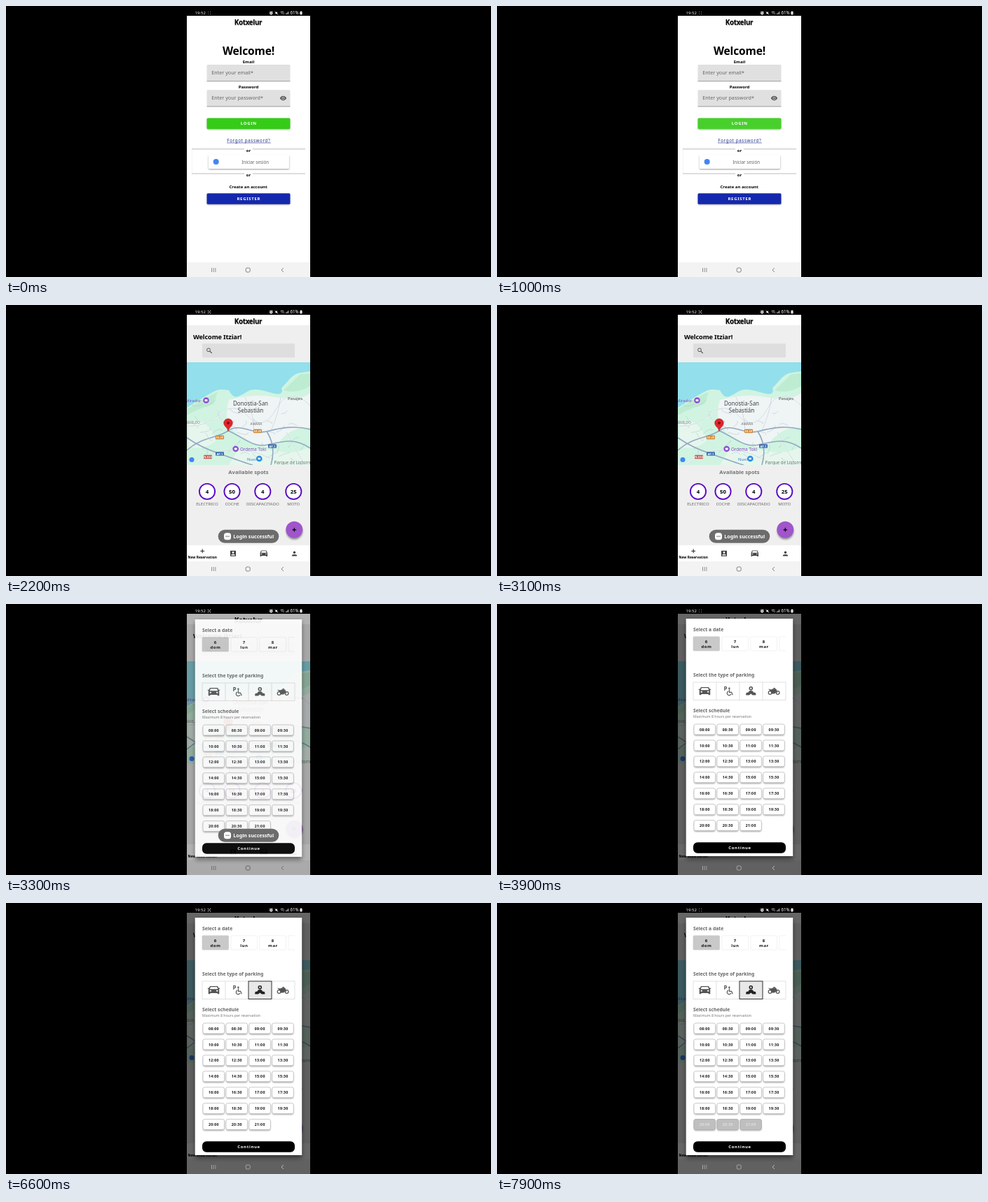
Write an HTML page that moves like this. It is 692 px wide and 388 px high and loops after 8 s.

```html
<!DOCTYPE html>
<html lang="en">
<head>
<meta charset="utf-8">
<title>Parking reservation</title>
<style>
html, body { margin: 0; width: 100%; height: 100%; overflow: hidden; background: #000; }
svg { display: block; font-family: "Noto Sans", "Open Sans", sans-serif; }
text { text-anchor: middle; font-weight: 500; }
.l { text-anchor: start; }
.b { font-weight: 700; }
.s { font-weight: 600; }
.a { animation: 8s linear infinite; }
#login { animation-name: login; }
#press { animation-name: press; }
#shift { animation-name: shift; }
#mark { animation-name: mark; }
#map { animation-name: map; }
#spots { animation-name: spots; }
#fab { animation-name: fab; }
#dim { animation-name: dim; }
#lit { animation-name: lit; }
#dialog { animation-name: dialog; }
#pick { animation-name: pick; }
#slot0 { animation-name: slot0; }
#slot1 { animation-name: slot1; }
#slot2 { animation-name: slot2; }
#toast { animation-name: toast; }
@keyframes login { 0%, 13.5% { opacity: 1; } 16%, 100% { opacity: 0; } }
@keyframes press { 0%, 12.3% { opacity: 0; } 13%, 100% { opacity: .3; } }
@keyframes shift { 0%, 24.9% { transform: translateY(41px); } 25%, 100% { transform: none; } }
@keyframes mark { 0%, 18.2% { opacity: 0; } 19%, 100% { opacity: 1; } }
@keyframes map { 0%, 23.7% { opacity: 0; } 27.2%, 100% { opacity: 1; } }
@keyframes spots { 0%, 24.9% { opacity: 0; } 25%, 100% { opacity: 1; } }
@keyframes fab { 0%, 34.5% { opacity: 0; } 35.2% { opacity: .3; } 36.5%, 100% { opacity: 0; } }
@keyframes dim { 0%, 40.6% { opacity: 0; } 41.25% { opacity: .3; } 43.75%, 100% { opacity: .6; } }
@keyframes lit { 0%, 40.6% { opacity: 0; } 43.75%, 100% { opacity: 1; } }
@keyframes dialog {
  0%, 40.6% { opacity: 0; transform: translateY(3px); }
  41.25% { opacity: .92; transform: translateY(1px); }
  43.75%, 100% { opacity: 1; transform: none; }
}
@keyframes pick { 0%, 54.6% { opacity: 0; } 58.75%, 100% { opacity: 1; } }
@keyframes slot0 { 0%, 82.5% { opacity: 0; } 85%, 100% { opacity: 1; } }
@keyframes slot1 { 0%, 86.5% { opacity: 0; } 89%, 100% { opacity: 1; } }
@keyframes slot2 { 0%, 92% { opacity: 0; } 95%, 100% { opacity: 1; } }
@keyframes toast { 0%, 18.2% { opacity: 0; } 20%, 41.5% { opacity: 1; } 45%, 100% { opacity: 0; } }
</style>
</head>
<body>
<svg id="stage" width="692" height="388" viewBox="0 0 692 388">
  <defs>
    <clipPath id="phone"><path d="M258 0h176v388h-176z"/></clipPath>
    <clipPath id="mapBox"><path d="M258 82.500h176v146.500h-176z"/></clipPath>
    <filter id="soft" x="-20%" y="-20%" width="140%" height="160%"><feGaussianBlur stdDeviation="1"/></filter>
    <filter id="wide" x="-10%" y="-10%" width="120%" height="120%"><feGaussianBlur stdDeviation="3"/></filter>
  </defs>
</svg>
<script>
const text = (x, y, str, size, fill = '#000', cls = '', gap = 0) =>
  `<text x="${x}" y="${y}" font-size="${size}" fill="${fill}" class="${cls}" letter-spacing="${gap}">${str}</text>`;
const rect = (x, y, w, h, fill, r = 0, more = '') =>
  `<rect x="${x}" y="${y}" width="${w}" height="${h}" fill="${fill}" rx="${r}" ${more}/>`;
const dot = (x, y, r, fill, more = '') => `<circle cx="${x}" cy="${y}" r="${r}" fill="${fill}" ${more}/>`;
const line = (d, stroke, w = 1, more = '') => `<path d="${d}" fill="none" stroke="${stroke}" stroke-width="${w}" ${more}/>`;
const icon = (d, x, y, s, fill, sy = s) =>
  `<path transform="translate(${x} ${y}) scale(${s} ${sy}) translate(-12 -12)" d="${d}" fill="${fill}" fill-rule="evenodd"/>`;
const group = (id, body) => `<g id="${id}" class="a">${body}</g>`;
const shadow = (x, y, w, h, r, o = .4, blur = 'soft') => rect(x, y, w, h, '#000', r, `opacity="${o}" filter="url(#${blur})"`);
const band = (y, h, fill) => rect(258, y, 176, h, fill);

// Icons on a 24-unit grid
const CAR = 'M3 12L5 6Q5.4 5 6.5 5h11Q18.6 5 19 6l2 6v9h-3v-2H6v2H3zM5.2 11h13.6L17.3 6.7H6.7zM5 14.5a1.5 1.5 0 1 0 3 0a1.5 1.5 0 1 0-3 0zm11 0a1.5 1.5 0 1 0 3 0a1.5 1.5 0 1 0-3 0z';
const PERSON = 'M12 12a4 4 0 1 0 0-8a4 4 0 0 0 0 8zM4 20v-2q0-4 8-4t8 4v2z';
const CARD = 'M3 3h18v18H3zM12 12a3 3 0 1 0 0-6a3 3 0 0 0 0 6zM6 18h12v-1q0-3-6-3t-6 3z';
const EYE = 'M1 12Q5 4.5 12 4.5T23 12Q19 19.5 12 19.5T1 12zM12 17a5 5 0 1 0 0-10a5 5 0 0 0 0 10zM12 15a3 3 0 1 1 0-6a3 3 0 0 1 0 6z';
const BRAND = '#4285f4';

const title = text(346, 28, 'Kotxelur', 9.8, '#aaa', 'b', -.3) + text(345.5, 27, 'Kotxelur', 9.8, '#000', 'b', -.3);

const statusBar = () => band(0, 14, '#000') +
  text(269.5, 12, '19:52', 6, '#eee', 'l') +
  `<path d="M288 8h1v1h-1zm3 0h1v1h-1zm-3 3h1v1h-1zm3 0h1v1h-1z" fill="#999"/>` +
  `<g id="scan">${line('M288 9.2V8h1.2M290.8 8H292v1.2M292 10.8V12h-1.2M289.2 12H288v-1.2M289 9l2 2M291 9l-2 2', '#bbb', .6)}</g>` +
  dot(378.3, 10.2, 1.6, '#555', 'stroke="#fff" stroke-width="1.2"') + line('M376 8.4l1-1M380.6 8.4l-1-1', '#fff', .8) +
  icon('M4 9h5l7-6v18l-7-6H4z', 386, 10, .23, '#fff') + line('M383.6 7.6l4.8 4.8', '#fff', .6) +
  line('M391.5 9q2.5-2 5 0M392.7 10.5q1.3-1 2.6 0', '#ddd', .8) + line('M395.5 12.2l1.500-2', '#ddd', .7) +
  line('M399.5 12v-1.200M401 12v-2.400M402.6 12V8', '#ddd', .9) +
  text(405.5, 12.2, '61%', 6.2, '#fff', 'l') + rect(419.3, 8, 3.4, 4.5, '#ddd', 1) + line('M421 7v2', '#fff', .9);

const navKeys = ink => line('M293.5 375v6M296.2 375v6M298.9 375v6', ink, .8) +
  rect(342.2, 375, 6, 6, 'none', 1.8, `stroke="${ink}" stroke-width=".9"`) +
  line('M396 375l-3 3l3 3', ink, .9);
const navStrip = () => band(367, 21, '#f3f3f3') + navKeys('#777');

const field = (y, label, hint) => text(346, y - 2.2, label, 6, '#000', 's') +
  rect(286.5, y, 119, 24, '#e0e0e0', 1.5) + line(`M286.5 ${y + 23.7}h119`, '#8c8c8c', .8) +
  text(293.3, y + 14.2, hint, 7.1, '#666', 'l', .04);

const button = (y, h, label, fill, gap) => shadow(287, y + 1, 118, h, 1.5, .35) +
  rect(286.5, y, 119, h, fill, 1.5) + text(346.3, y + h / 2 + 2.2, label, 6, '#fff', 's', gap);

const divider = y => line(`M265 ${y}h75M352 ${y}h75`, '#b5b5b5', .9) + text(346, y + 4.2, 'or', 6, '#000', 's');

const login = () => band(14, 353, '#fff') + title +
  text(346, 70, 'Welcome!', 15.6, '#000', 'b', -.15) +
  field(84, 'Email', 'Enter your email*') +
  field(120.2, 'Password', 'Enter your password*') + icon(EYE, 395.5, 132, .42, '#555') +
  button(160.5, 15.5, 'LOGIN', '#35cc17', .65) +
  group('press', rect(286.5, 160.5, 119, 15.5, '#fff', 1.5)) +
  text(346.3, 194.6, 'Forgot password?', 6.2, '#26358f', '', .65) + line('M315 196h63', '#26358f', .6) +
  line('M265.5 205v34', '#eee', .6) + divider(204.8) +
  shadow(289, 214.5, 115, 19.5, 1) + rect(288.8, 213, 115.2, 20, '#fff', 1) +
  dot(299.7, 223, 4, BRAND) + text(355.7, 225.5, 'Iniciar sesión', 6.3, '#666') +
  divider(240) + text(345.7, 260.6, 'Create an account', 6, '#000', 's') +
  button(268.2, 15.5, 'REGISTER', '#1428ad', .7) + navStrip();

const shield = (x, y, str, fill) => rect(x - 6, y - 2.7, 12, 5.4, fill, 1) + text(x, y + 1.6, str, 4, '#fff', 'b');

// A loose web of side streets
const streets = () => {
  let d = '';
  for (let i = 0; i < 34; i++) {
    const x = 266 + (i * 61.8) % 160, y = 142 + (i * 37.3) % 78;
    d += `M${x} ${y}q${8 * Math.sin(i)} ${6 * Math.cos(i * 2)} ${16 * Math.cos(i * 3)} ${10 * Math.sin(i * 5)}`;
  }
  return line(d, '#b9c9d6', .6);
};

const map = () => {
  const main = 'M258 208C280 188 300 192 317 180S352 186 372 181S410 172 434 178M317 180C340 190 352 205 374 200S412 190 434 205M258 190C275 202 290 208 305 213S340 226 352 229M372 181C381 195 383 212 378 229';
  const minor = 'M258 174q30 0 48-18t40 4t40-12t48-4M300 150q10 20 17 30M340 130q14 24 14 52M392 132q-4 26-14 48M400 182q10 22 26 46M270 229q20-20 50-22t60 14';
  return `<g clip-path="url(#mapBox)">` + band(82, 147, '#93dfec') +
    `<path d="M258 147Q272 138 284 131T301 122T318 122Q324 134 331 131T346 123T376 125T393 119L403 108Q411 98 420 97L434 95V229H258z" fill="#d0f4e1"/>` +
    `<path d="M318 136Q350 126 385 132T434 126V176Q408 174 392 194T340 190Q306 176 318 136z" fill="#eff4f4"/>` +
    `<path d="M260 168q14-6 25 3t14 24q-18 14-39 8zM330 209q30-6 55 0t49-6v26H318z" fill="#e6f6ed"/>` +
    `<path d="M258 149Q275 138 302 124L296 142Q275 148 258 158zM396 122L420 99L434 98V116Q415 128 396 122z" fill="#bdecd2"/>` +
    streets() + line(minor, '#fff', 1.4) + line(minor, '#b5c6d5', .7) + line(main, '#93a9c1', 1.6) +
    text(256, 139.3, 'Mirador', 6, '#8350bd', 'l') + dot(285.5, 136.5, 4.3, '#8e4fd0') + rect(283.6, 135, 3.8, 3, '#fff', .6) +
    text(349, 143.6, 'Donostia-San', 8, '#444') + text(349, 153.5, 'Sebastián', 8, '#444') +
    text(412.5, 135.7, 'Pasajes', 6, '#444') + text(357, 171.5, 'AMARA', 4.6, '#666', '', .2) +
    text(256, 169.5, 'IGUELDO', 4.6, '#777', 'l', .1) +
    shield(305, 189.5, 'GI-20', '#cf8232') + shield(359, 180.5, 'GI-20', '#cf8232') +
    shield(380, 202, 'AP-1', '#3f6fb0') + shield(305, 213, 'AP-1', '#3f6fb0') + shield(288, 217.5, 'N-634', '#c05a57') +
    dot(327.7, 206, 4.3, '#8e4fd0') + rect(325.8, 204.5, 3.8, 3, '#fff', .4) +
    text(334, 209, 'Ordema Toki', 6.2, '#8350bd', 'l') +
    text(344, 222.8, 'Nuxi', 6, '#3a78c9', 'l') + dot(361.3, 220, 4.3, '#2f8fe0') + rect(359.6, 218.8, 3.4, 2.4, '#fff', .4) +
    text(382.5, 228, 'Parque de Listorreta', 6.2, '#667a70', 'l') +
    `<path d="M317 181Q316.500 177 312.500 173.500A6.300 6.300 0 1 1 321.500 173.500Q317.500 177 317 181z" fill="#e3242b" stroke="#9c1a20" stroke-width=".5"/>` +
    dot(317, 169, 2, '#7c1116') + '</g>';
};

const spot = ([x, n, label]) =>
  dot(x, 267, 11.1, '#fff', 'stroke="#5a0ac4" stroke-width="1.9"') +
  text(x, 270, n, 7.8, '#000', 'b') + text(x, 287.4, label, 6.1, '#666');

const home = () => band(14, 330, '#efefef') + band(14, 15, '#fff') + title +
  text(267, 49, 'Welcome Itziar!', 9.2, '#000', 'b l', -.14) +
  rect(280, 55.3, 132, 20, '#dedede', 1) +
  dot(289, 64.3, 2.4, 'none', 'stroke="#555" stroke-width="1"') + line('M290.8 66.1l2.900 2.900', '#555', 1.2) +
  group('map', map()) +
  group('shift', group('mark', dot(265, 221.5, 3.5, BRAND)) + text(346, 242.2, 'Available spots', 7.6, '#757575', 's')) +
  group('spots', [[287, 4, 'ELECTRICO'], [322.5, 50, 'COCHE'], [366.3, 4, 'DISCAPACITADO'], [410.3, 25, 'MOTO']].map(spot).join('')) +
  dot(411.5, 324, 12, '#000', 'opacity=".35" filter="url(#soft)"') + dot(411.3, 321.8, 12, '#a055cb') +
  group('fab', dot(411.3, 321.8, 12, '#fff')) + line('M408.500 321.800h5.600M411.300 319v5.600', '#000', 1.2) +
  band(344, 23, '#fff') + line('M277.300 352.300h5.800M280.200 349.400v5.800', '#222', 1) +
  text(280.2, 363.2, 'New Reservation', 4.9, '#000', 'b') +
  icon(CARD, 324, 355.8, .45, '#444') + icon(CAR, 367.8, 355.2, .58, '#444', .54) + icon(PERSON, 411.5, 356, .45, '#444') + navStrip();

const day = (x, n, name, on) =>
  rect(x, 46.8, 37.5, 20.2, on ? '#c9c9c9' : '#fff', 1, `stroke="${on ? '#c9c9c9' : '#ececec'}" stroke-width=".7"`) +
  text(x + 18.7, 55.5, n, 6, '#111', 's', .3) + text(x + 18.9, 63.2, name, 6, '#111', 's', .5);

const wheelchair = x => text(x - 3, 123.6, 'P', 8, '#555', 'b') + dot(x + 2.4, 120.8, 1.2, '#555') +
  line(`M${x + 2.4} 122.300v4h3.200l1.600 4M${x + 1} 125a3 3 0 1 0 4 4`, '#555', 1.2);
const attended = (x, c) => dot(x, 120.7, 2, 'none', `stroke="${c}" stroke-width="1.6"`) +
  `<path d="M${x - 3.5} 126.500q0-2.500 3.500-2.500t3.500 2.500l3 .5q1 2 .5 3.500h-4.500l-2.500-2l-2.500 2h-4.500q-.5-1.500 .5-3.500z" fill="${c}"/>`;
const bike = x => dot(x - 5.4, 127, 2.4, 'none', 'stroke="#555" stroke-width="1.2"') +
  dot(x + 5.6, 127, 2.4, 'none', 'stroke="#555" stroke-width="1.2"') +
  `<path d="M${x - 8} 121.600l4 .8l4-1.500l3.500 1l1 3l-3.500 3.500h-4l-2-4z" fill="#555"/>` + line(`M${x + 5} 127l-3.500-6.500h-2`, '#555', 1);

const pad = n => String(n).padStart(2, '0');
const slot = i => {
  const x = 281 + 32.9 * (i % 4), y = 172 + 22.93 * Math.floor(i / 4);
  const label = pad(8 + (i >> 1)) + (i % 2 ? ':30' : ':00');
  const face = (fill, ink) => rect(x, y, 30.6, 15, fill, 2.5, 'stroke="#aaa" stroke-width=".6"') +
    text(x + 15.4, y + 9.6, label, 5.2, ink, 's', .33);
  return shadow(x + .3, y + 1.4, 30, 15, 2.5, .35) + face('#fff', '#111') +
    (i > 23 ? group('slot' + (i - 24), face('#bfbfbf', '#e0e0e0')) : '');
};

const dialog = () => shadow(270, 24, 152, 341, 2, .5, 'wide') + rect(269.7, 21, 152.5, 340, '#fff') +
  text(280, 38.5, 'Select a date', 6.8, '#666', 's l') +
  day(280, 6, 'dom', true) + day(321, 7, 'lun') + day(362, 8, 'mar') + line('M412 46.800h-9v20.200h9', '#ececec', .7) +
  text(280, 103.7, 'Select the type of parking', 6.8, '#666', 's l') +
  rect(280, 112, 132, 25.5, '#fff', 0, 'stroke="#d9d9d9" stroke-width=".8"') + line('M313 112v25.500M346 112v25.500M379 112v25.500', '#d9d9d9', .8) +
  icon(CAR, 296.5, 124, .86, '#555', .7) + line('M287.800 122.300h3M302.200 122.300h3', '#555', 1.2) +
  wheelchair(329) + attended(362.3, '#555') + bike(395) +
  group('pick', rect(346, 112, 33, 25.5, '#e8e8e8', 0, 'stroke="#222" stroke-width=".9"') + attended(362.3, '#222')) +
  text(280, 154.7, 'Select schedule', 6.8, '#666', 's l') +
  text(280, 162.8, 'Maximum 8 hours per reservation', 5.2, '#777', 'l') +
  Array.from({ length: 27 }, (_, i) => slot(i)).join('') +
  rect(280, 341.3, 132, 15.4, '#000', 6) + text(346.5, 351.3, 'Continue', 6, '#fff', 's', .65);

const toast = () => rect(302.7, 321.7, 86.6, 19, '#6c6c6c', 9.5) + rect(311, 326.3, 10, 10, '#fff', 3.5) +
  line('M313 331.300h6', '#aaa', 1.6) + text(324.3, 333.9, 'Login successful', 7.1, '#fff', 's l');

const stage = document.getElementById('stage');
stage.insertAdjacentHTML('beforeend', `<g clip-path="url(#phone)">` + home() + group('login', login()) +
  group('dim', band(14, 374, '#000')) + group('lit', navKeys('#c8c8c8')) +
  group('dialog', dialog()) + group('toast', toast()) + statusBar() + '</g>');

// The recording indicator blinks at its own pace, so it follows the loop clock.
const scan = document.getElementById('scan');
const clock = document.getElementById('login').getAnimations()[0];
function tick() {
  const t = (clock ? clock.currentTime : performance.now()) % 8000;
  scan.style.opacity = (t + 473) % 503 < 260 ? 1 : 0;
  requestAnimationFrame(tick);
}
tick();
</script>
</body>
</html>
```
